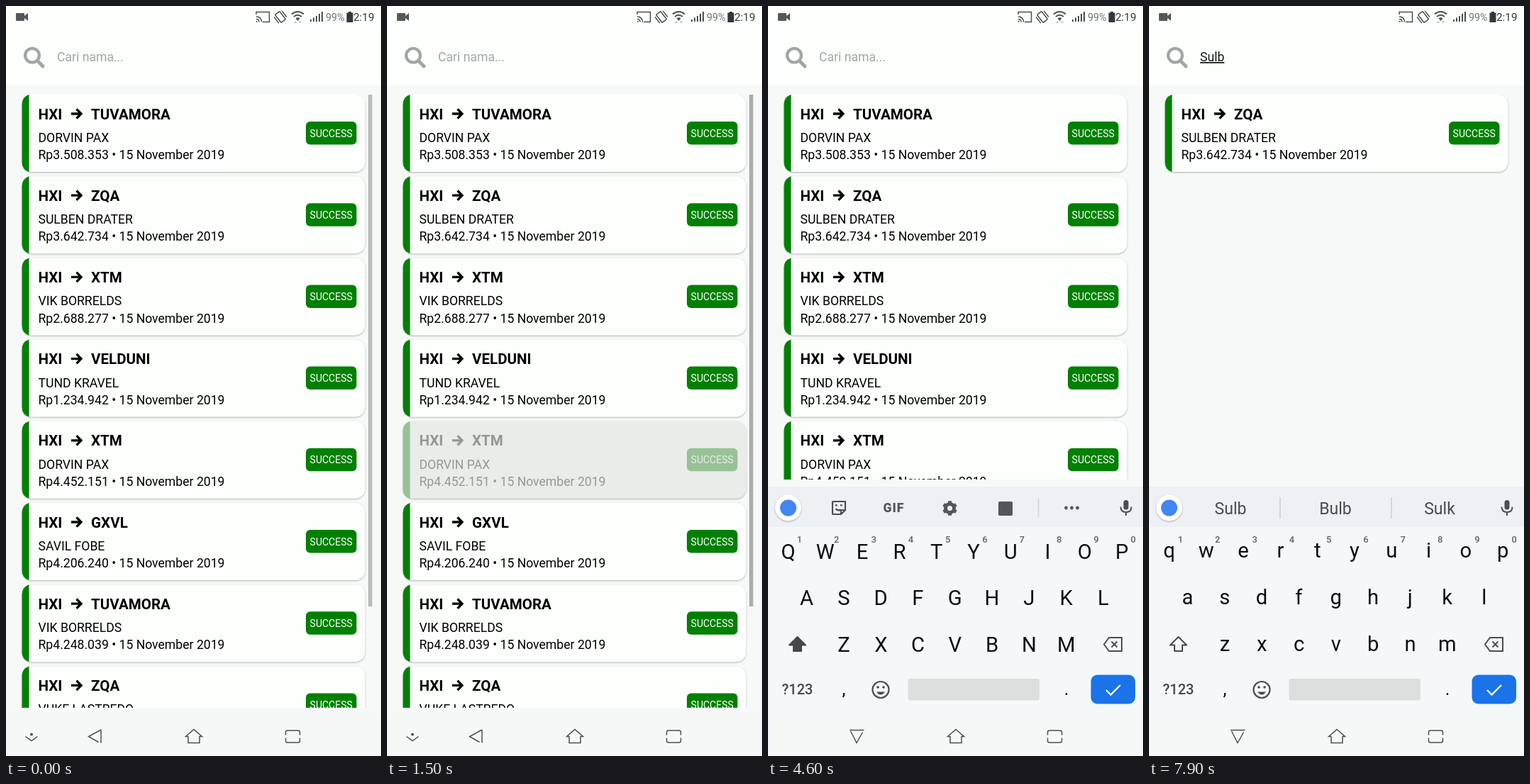
Write an HTML page that moves like this. It is 529x1058 px and loops after 8 s.

```html
<!DOCTYPE html>
<html lang="id">
<head>
<meta charset="utf-8">
<title>Transaction list</title>
<style>
html, body { margin: 0; width: 100%; height: 100%; overflow: hidden; background: #f7f9f8; }
#stage { display: block; width: 100%; height: 100%; font-family: Roboto, sans-serif; }
.line { fill: none; stroke: #4b4f52; stroke-width: 1.5; }
.title { font-size: 20.57px; font-weight: 700; }
.body { font-size: 17.63px; }
.badge { font-size: 14px; fill: #fff; text-anchor: middle; }
.mid { text-anchor: middle; }
.key { font-size: 29.2px; fill: #0c0d0e; text-anchor: middle; }
.hint { font-size: 13px; font-weight: 500; fill: #5f6368; text-anchor: middle; }
.word { font-size: 23px; fill: #484c50; text-anchor: middle; }
.shadow { filter: drop-shadow(0 1px 1px rgba(0, 0, 0, .3)); }
</style>
</head>
<body>
<svg id="stage" viewBox="0 0 529 1058" preserveAspectRatio="none">
  <rect width="529" height="1058" fill="#f7f9f8"/>
  <rect width="529" height="112" fill="#fdfffd"/>

  <g id="status">
    <path d="M15 10h10q1 0 1 1v3l5-4v11l-5-4v3q0 1-1 1H15q-1 0-1-1v-9q0-1 1-1z" fill="#55585a"/>
    <g class="line">
      <path d="M353 12V8.500h18.500v14H362M353 15q7 0 7.500 7.500M353 18.500q4 0 4 4"/>
      <path d="M353 22h1.500" stroke-width="2"/>
      <g transform="rotate(-38 387 15.500)">
        <rect x="383" y="8.500" width="8" height="14" rx="1"/>
        <path d="M380 10v11M394 10v11"/>
      </g>
      <path d="M403 11.500q8.500-7 17 0M406 15q5.500-4.500 11 0" stroke-width="2"/>
    </g>
    <path d="M408.500 17.500q3-2.500 6 0l-3 3.500z" fill="#4b4f52"/>
    <g id="wifi"><path d="M405.500 24l2.500-3 2.500 3zM412.500 21.500h5l-2.500 3z"/></g>
    <path d="M430 22v-3M434 22v-5.500M438 22v-8M442 22V11M446 22V8" stroke="#4b4f52" stroke-width="2"/>
    <text x="451" y="20.500" font-size="14.300" fill="#707476">99%</text>
    <path d="M480.500 9.500h2.500V8h4v1.500h2.500V23h-9z" fill="#33373a"/>
    <text x="490" y="21" font-size="15.300" fill="#33373a">2:19</text>
  </g>

  <g fill="none" stroke="#a3a5a4" stroke-linecap="round">
    <circle cx="37" cy="69.700" r="9.900" stroke-width="4.300"/>
    <path d="M45 78l7 7" stroke-width="5"/>
  </g>
  <text id="placeholder" class="body" x="72" y="78" fill="#a3a5a4">Cari nama...</text>
  <text id="typed" class="body" x="72" y="78" fill="#151716" text-decoration="underline"></text>
  <rect id="caret" y="58.500" width="2.400" height="26" fill="#0b9a84"/>

  <svg id="list" y="125" width="529" height="865" overflow="hidden">
    <g id="rows"></g>
    <rect id="bar" x="511" width="5.500" height="722" fill="#abadac"/>
  </svg>

  <g id="keyboard">
    <rect y="678" width="529" height="330" fill="#f4f8f9"/>
    <rect y="678" width="529" height="57" fill="#eef1f3"/>
    <circle class="shadow" cx="28.500" cy="708" r="18.500" fill="#fff"/>
    <circle cx="28.500" cy="708" r="11.500" fill="#4285f4"/>
    <g id="tools" fill="#51565a">
      <g class="line" stroke-width="2">
        <path d="M92 699h17v12l-6 6H92q-1 0-1-1v-16q0-1 1-1zM109 711h-6v6M95.500 709q3 4 7 1.500" style="stroke-width:2.200"/>
      </g>
      <path d="M95 703h2.500v2.500H95zM102 703h2.500v2.500H102z"/>
      <text class="mid" x="177.500" y="714" font-size="17.500" font-weight="800" letter-spacing="1">GIF</text>
      <g transform="translate(256.500 708.500)">
        <circle r="6" fill="none" stroke="#51565a" stroke-width="5"/>
        <path id="cog" fill="none" stroke="#51565a" stroke-width="5"/>
      </g>
      <rect x="325" y="699" width="20" height="20" rx="2"/>
      <path d="M381.500 695v26" stroke="#cfd3d5" stroke-width="1.500"/>
      <circle cx="420.500" cy="708" r="2.400"/><circle cx="428.500" cy="708" r="2.400"/><circle cx="436.500" cy="708" r="2.400"/>
    </g>
    <g id="words">
      <path d="M185 693v30M342 693v30" stroke="#c9cdcf" stroke-width="1.500"/>
      <text class="word" x="115" y="716.500"></text>
      <text class="word" x="263" y="716.500"></text>
      <text class="word" x="410" y="716.500"></text>
    </g>
    <rect x="501.500" y="697" width="7" height="13.500" rx="3.500" fill="#4b4f52"/>
    <path class="line" d="M497.500 706.500q0 7.500 7.500 7.500t7.500-7.500M505 714v5" style="stroke-width:2"/>
    <g id="letters"></g>
    <path id="shift" d="M41.500 890l11.500 11.500h-6v8.500H36v-8.500h-6z" stroke="#44484b" stroke-width="2" stroke-linejoin="round"/>
    <path class="line" d="M481 891h18v19h-18l-7-9.500zM484.500 896.500l8 8M492.500 896.500l-8 8" style="stroke-width:2"/>
    <text class="mid" x="41.500" y="971" font-size="20" font-weight="500" fill="#44484b">?123</text>
    <text class="key" x="107" y="972" style="font-size:25px">,</text>
    <text class="key" x="421" y="972" style="font-size:25px">.</text>
    <g class="line" style="stroke-width:2.200">
      <circle cx="159" cy="964.500" r="11.500"/>
      <path d="M153 967.500q6 8 12 0z" fill="#44484b" stroke="none"/>
    </g>
    <circle cx="155" cy="961" r="1.800" fill="#44484b"/><circle cx="163" cy="961" r="1.800" fill="#44484b"/>
    <rect x="197.500" y="949" width="185.500" height="30.500" rx="3" fill="#dddfde"/>
    <rect x="455.500" y="943.500" width="62.500" height="41" rx="9" fill="#1a73e8"/>
    <path d="M477 965l6.500 6.500 13.500-13.500" fill="none" stroke="#fff" stroke-width="2.300"/>
  </g>

  <rect y="1003" width="529" height="55" fill="#f6f8f7"/>
  <g class="line">
    <g id="navIdle">
      <path d="M27.500 1030.500l8.500 6 8.500-6"/>
      <circle cx="36" cy="1027.500" r="2" fill="#4b4f52" stroke="none"/>
      <path d="M134 1021v18.500M134 1021l-17.500 9.500 14 8"/>
    </g>
    <path id="navTyping" d="M115 1021.500h20.500M116.500 1023l8.500 16.500 8.500-15"/>
    <path d="M253.500 1030.500l11.500-10 11.500 10h-3.500v9h-16v-9z"/>
    <path d="M394.500 1028.500v-4q0-2.500 2.500-2.500h15q2.500 0 2.500 2.500v4M394.500 1032.500v4q0 2.500 2.500 2.500h15q2.500 0 2.500-2.500v-4"/>
  </g>
</svg>

<script>
const LOOP = 8000, STEP = 100, PITCH = 115.2, MAX_SCROLL = 171, VIEW = 865;
const $ = id => document.getElementById(id);

const transfers = [
  ['TUVAMORA', 'DORVIN PAX', '3.508.353'],
  ['ZQA', 'SULBEN DRATER', '3.642.734'],
  ['XTM', 'VIK BORRELDS', '2.688.277'],
  ['VELDUNI', 'TUND KRAVEL', '1.234.942'],
  ['XTM', 'DORVIN PAX', '4.452.151'],
  ['GXVL', 'SAVIL FOBE', '4.206.240'],
  ['TUVAMORA', 'VIK BORRELDS', '4.248.039'],
  ['ZQA', 'VUKE LASTREDO', '2.562.800'],
  ['XTM', 'VIK BORRELDS', '1.165.626']
];

const cardMarkup = ([bank, name, amount]) => `<g>
  <rect class="shadow" x="22.5" width="484" height="109" rx="14" fill="#e1e4e1"/>
  <g class="face">
    <rect x="22.5" width="484" height="109" rx="14" fill="#fdfffd"/>
    <path d="M32.500 0v109q-10-3-10-14V14q0-11 10-14z" fill="#028002"/>
    <text class="title" x="45.500" y="34.500">HXI</text>
    <path d="M92 27h13M99.500 20.300l6.500 6.700-6.500 6.700" fill="none" stroke="#000" stroke-width="3.300"/>
    <text class="title" x="120" y="34.500">${bank}</text>
    <text class="body" x="45.500" y="67">${name}</text>
    <text class="body" x="45.500" y="91.300">Rp${amount} • 15 November 2019</text>
    <rect x="423" y="38" width="71.500" height="32.500" rx="6" fill="#028002"/>
    <text class="badge" x="458.700" y="59.500">SUCCESS</text>
  </g></g>`;

$('rows').innerHTML = transfers.map(cardMarkup).join('');
const cards = [...$('rows').children];
const pressed = cards[4].querySelector('.face');

const keyRows = [['QWERTYUIOP', 28.5, 779.5], ['ASDFGHJKL', 54.5, 845], ['ZXCVBNM', 107, 911]];
$('letters').innerHTML = keyRows.map(([keys, x, y], row) => [...keys].map((key, i) => {
  const cx = x + i * 52.3;
  const hint = row ? '' : `<text class="hint" x="${cx + 16}" y="757">${(i + 1) % 10}</text>`;
  return `<text class="key" x="${cx}" y="${y}">${key}</text>${hint}`;
}).join('')).join('');
const keys = [...document.querySelectorAll('#letters .key')];
const words = [...document.querySelectorAll('#words text')];

$('cog').setAttribute('d', Array.from({ length: 6 }, (_, i) => {
  const a = i * Math.PI / 3 + Math.PI / 6, c = Math.cos(a), s = Math.sin(a);
  return `M${6 * c} ${6 * s}L${10.3 * c} ${10.3 * s}`;
}).join(''));

const show = (el, on) => el.setAttribute('visibility', on ? 'visible' : 'hidden');
const ramp = (t, from, to) => Math.min(1, Math.max(0, (t - from) / (to - from)));
const easeOut = u => 1 - (1 - u) ** 2;
const within = (t, from, to) => t >= from && t < to;
const latest = (t, list) => list.reduce((value, [time, next]) => t >= time ? next : value, null);

const typing = [[0, ''], [5600, 'S'], [6100, 'Su'], [7100, 'Sul'], [7400, 'Sulb']];
const filters = [[0, ''], [5700, 'S'], [6200, 'SU']];
const suggestions = [[0, []], [5700, ['S', 'So', 'Same']], [6200, ['Su', 'Sure', 'Sunday']], [7400, ['Sulb', 'Bulb', 'Sulk']]];
const caretSpans = [[4100, 4600], [5100, 6600], [7100, 7900]];

function drawList(t) {
  const scroll = MAX_SCROLL * (easeOut(ramp(t, 0, 950)) - easeOut(ramp(t, 1100, 1500)));
  const query = latest(t, filters);
  let slot = 0;
  cards.forEach((card, i) => {
    const match = transfers[i][1].includes(query);
    card.setAttribute('display', match ? 'inline' : 'none');
    if (match) card.setAttribute('transform', `translate(0 ${slot++ * PITCH})`);
  });
  $('rows').setAttribute('transform', `translate(0 ${-scroll})`);
  pressed.setAttribute('opacity', 1 - 0.67 * (ramp(t, 1400, 1500) - ramp(t, 1500, 1800)));
  $('bar').setAttribute('y', scroll * 143 / MAX_SCROLL);
  $('bar').setAttribute('opacity', t < STEP ? 0.8 : 1 - ramp(t, 2000, 2400));
  $('list').setAttribute('height', t < 4500 ? VIEW : 543);
}

function drawField(t) {
  const text = latest(t, typing);
  $('typed').textContent = text;
  show($('placeholder'), !text);
  show($('caret'), caretSpans.some(span => within(t, ...span)));
  $('caret').setAttribute('x', 71.5 + (text ? $('typed').getComputedTextLength() : 0));
}

function drawKeyboard(t) {
  const rise = easeOut(ramp(t, 4300, 4600)), lower = t >= 5600;
  const picks = latest(t, suggestions);
  show($('keyboard'), rise > 0);
  $('keyboard').setAttribute('transform', `translate(0 ${(1 - rise) * 325})`);
  $('tools').setAttribute('display', picks.length ? 'none' : 'inline');
  $('words').setAttribute('display', picks.length ? 'inline' : 'none');
  words.forEach((word, i) => word.textContent = picks[i] || '');
  keys.forEach(key => {
    key.textContent = lower ? key.textContent.toLowerCase() : key.textContent.toUpperCase();
    key.setAttribute('dy', lower ? -1.5 : 0);
  });
  $('shift').setAttribute('fill', lower ? 'none' : '#44484b');
  show($('navIdle'), !rise);
  show($('navTyping'), rise > 0);
}

function draw(time) {
  const t = Math.floor(time % LOOP / STEP) * STEP;
  drawList(t);
  drawField(t);
  drawKeyboard(t);
  $('wifi').setAttribute('fill', within(t, 2200, 3300) ? '#33373a' : '#c3c6c7');
}

let start;
function tick(now) {
  start ??= now;
  draw(now - start);
  requestAnimationFrame(tick);
}
draw(0);
requestAnimationFrame(tick);
</script>
</body>
</html>
```
